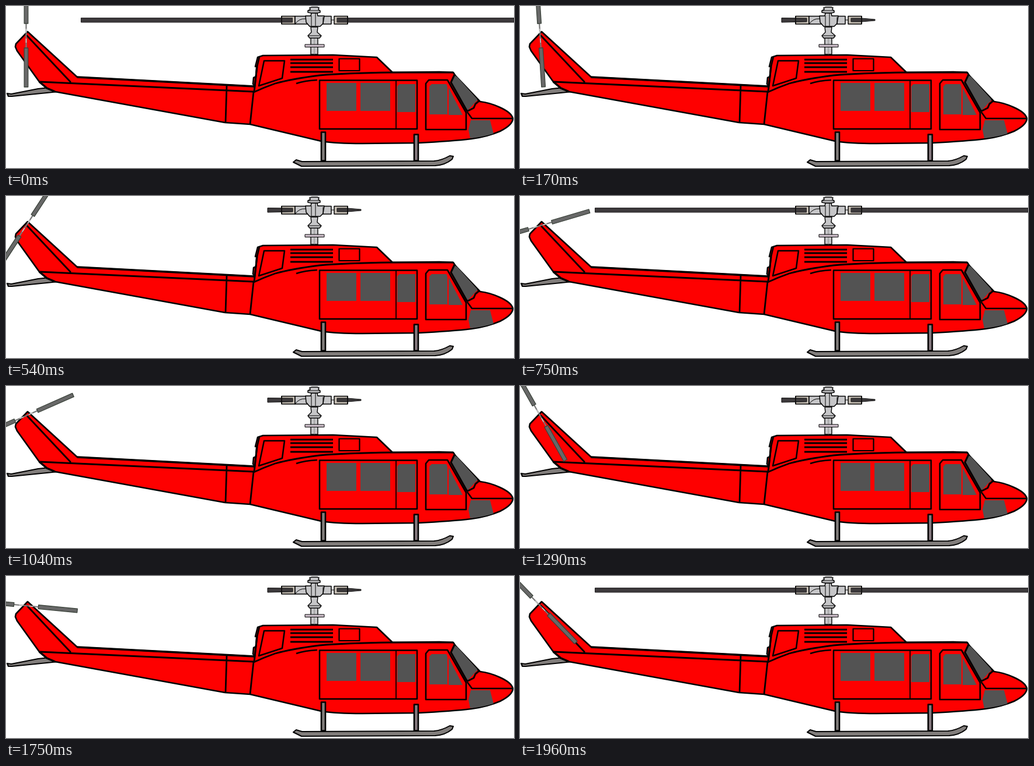
These frames come from a looping animation (870x278 px, 2 s). An HTML page with a canvas:

```html
<!DOCTYPE html>
<html lang="en">
<head>
<meta charset="utf-8">
<title>Helicopter</title>
<style>
html, body { margin: 0; width: 100%; height: 100%; overflow: hidden; background: #fff; }
canvas { display: block; }
</style>
</head>
<body>
<canvas id="stage" width="870" height="278"></canvas>
<script>
const ctx = document.getElementById('stage').getContext('2d');
const LOOP = 2000, SHOWN = 48, STEPS = 50;
const RED = '#fe0000', GLASS = '#535353', METAL = '#c6c6c8', SKID = '#817d7b';

function paint(path, fill, line, color = '#000') {
  const p = new Path2D(path);
  if (fill) { ctx.fillStyle = fill; ctx.fill(p); }
  if (line) { ctx.strokeStyle = color; ctx.lineWidth = line; ctx.stroke(p); }
}

function box(x, y, w, h, fill, line, color) {
  paint(`M${x} ${y}h${w}v${h}h${-w}z`, fill, line, color);
}

function drawSkids() {
  box(540, 216.5, 7, 49, SKID, 2.6);
  box(699, 220.5, 7, 45, '#85797f', 2.6);
  paint('M492 268L497 264L507 267L733 266Q746 265 760 257L766 258L764 263Q752 273 735 274L506 275Z', SKID, 2);
}

function drawBody() {
  paint('M2 150L9 151L55 142L74 140L89 147L70 149L10 155L4 155Z', SKID, 2.2);
  // stepped fairing behind the engine
  paint('M434 87L431 88L427 104H433M429 106L428 120H433M429 121L424 123L423 134L427 137', RED, 2.6);
  paint(`M37 44L17 65L16 70L19 77L57 130L70 141L84 147L375 200L418 203L540 232
    Q565 236 610 236L705 235Q765 232 797 228Q825 224 846 215Q868 204 868 193
    Q866 183 846 174Q829 166 812 164L808 160L770 120L766 114L742 113L662 114
    L635 88L560 84L440 85L434 87L430 104L426 138L122 122Z`, RED, 2.6);

  // tail boom seams
  paint('M35 50L111 131M57 130L424 147M378 136L376 200M424 147L418 203', null, 2.8);
  paint('M122 122L426 138M57 130L70 141L84 147', null, 3.4);

  // engine cowling
  paint('M424 148Q441 140 461 133Q490 125 537 119Q580 115 662 114L766 114', null, 2.8);
  paint('M430 104L425 147', null, 3);
  paint('M442 94L477 94L473 124L433 137Z', null, 2.5);
  for (const y of [92, 98, 105, 113]) paint(`M487 ${y}H560`, null, 3);
  box(570.5, 90.5, 35, 20.5, null, 2.2);

  // cabin door and windows
  paint('M497 133Q512 128 533 127', null, 2.5);
  box(537, 127.5, 167, 83.5, null, 2.5);
  paint('M668 128V211', null, 1.8);
  box(549, 132, 51, 48, GLASS);
  box(607, 132, 51, 48, GLASS);
  paint('M674 134H701V182H670V138Z', GLASS);

  // cockpit
  paint('M724 127L756 127L788 183L788 212L719 212L719 133Z', null, 2.6);
  paint('M729 134H754L756 139V186H725V138Z', GLASS);
  paint('M758 140L782 187H758Z', GLASS);
  paint('M768 119L773 122L808 161L803 166L790 180L762 131Z', GLASS);
  paint('M768 118L762 131L790 181M808 160L810 163L804 168L801 175L789 181', null, 3);
  paint('M790 182L798 193H868', null, 2.5);
  paint('M796 196H829L835 219Q816 225 795 227L792 212Z', GLASS);
}

function drawMast() {
  box(522, 54, 12, 29, METAL, 1.4);
  paint('M528 55V83', null, 1, '#888');
  box(512, 66, 33, 4.5, '#cdbfca', 1);
  paint('M522 36L523 45L517 51L520 55H537L540 51L533 45L534 36Z', METAL, 1.4);
  paint('M517 51H540', null, 1);
  box(472, 17.5, 23, 13.5, '#c4bdb3', 1.5);
  box(562, 17.5, 23, 13.5, '#c4bdb3', 1.5);
  box(495, 17.5, 62, 13.5, METAL, 1.5);
  paint('M513 17H522L523 12H533L534 17H545L543 30L538 35H520L514 28Z', METAL, 1.5);
  paint('M523 12L517 11V8L521 6L520 3L524 2H533L536 3L535 6L538 8V11L533 12Z', METAL, 1.5);
  paint('M517 8H538M495 31Q502 21 513 22M523 17V34M530 12V34M543 19V30M557 24H562', null, 1);
}

function drawMainRotor(wide) {
  const dark = '#3d3a3c';
  if (wide) {
    box(128.5, 20.5, 362, 7.5, dark, 1, '#242224');
    box(567, 20.5, 303, 7.5, dark, 1, '#242224');
  } else {
    paint('M448 20.5L491 21V27L448 28Z', dark, 1, '#111');
    paint('M567 21L585 21L608 23V25L585 27H567Z', dark, 1, '#111');
  }
  paint('M472 17V31M585 17V31', null, 1.3);
}

function drawTailRotor(angle) {
  ctx.save();
  ctx.translate(34.5, 51);
  ctx.rotate(angle);
  paint('M-21 0H21', null, 2.2, '#777');
  paint('M-12 0H-5M5 0H12', null, 1.2, '#ddd');
  for (const x of [-88, 21]) box(x, -3.3, 67, 6.6, '#686868', 1.3, '#3c443c');
  ctx.restore();
}

function draw(now) {
  const t = Math.floor((now % LOOP) / 10) * 10;
  const shown = Math.floor((t + 4.99) * SHOWN / LOOP);
  const step = Math.floor(shown * STEPS / SHOWN);
  ctx.fillStyle = '#fff';
  ctx.fillRect(0, 0, 870, 278);
  ctx.lineJoin = 'round';
  drawBody();
  drawSkids();
  drawMast();
  drawMainRotor(step % 3 === 0);
  // six clockwise turns over the loop
  drawTailRotor(Math.PI / 2 + step * 6 * 2 * Math.PI / (STEPS - 1));
}

const start = performance.now();
function tick() {
  draw(performance.now() - start);
  requestAnimationFrame(tick);
}
tick();
</script>
</body>
</html>
```
